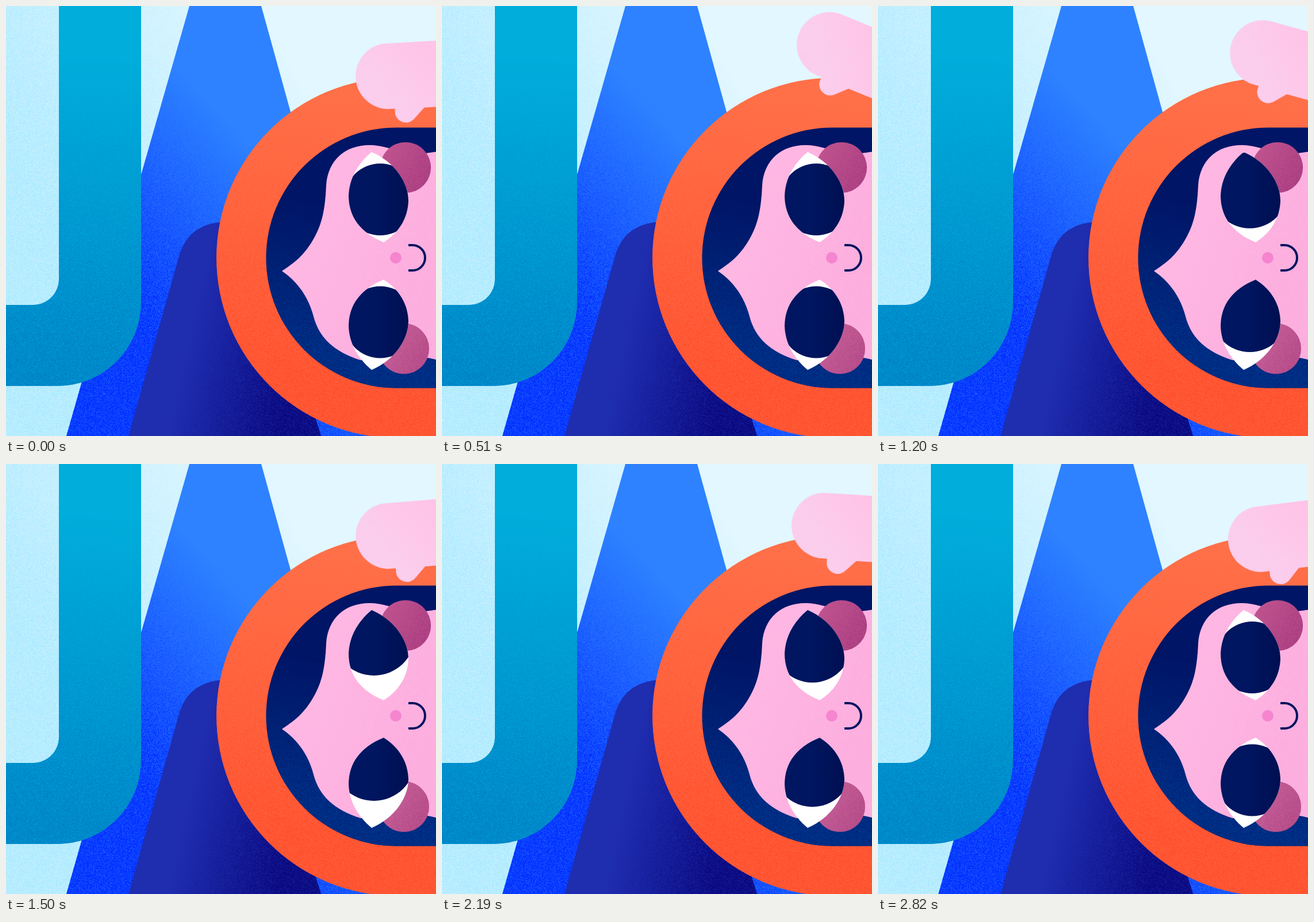
An HTML page with a canvas that plays this animation: 748x748 px, repeating every 2.85 s.

```html
<!DOCTYPE html>
<html>
<head>
<meta charset="utf-8">
<style>
html, body { margin: 0; width: 100%; height: 100%; overflow: hidden; background: #e2f7ff; }
canvas { display: block; }
</style>
</head>
<body>
<canvas id="stage" width="748" height="748"></canvas>
<script>
const W = 800, H = 748, LOOP = 2850, STEP = 30;
const ctx = document.getElementById('stage').getContext('2d');

let seed = 7;
const random = () => (seed = (seed * 1664525 + 1013904223) >>> 0) / 4294967296;

function makeLayer() {
  const c = document.createElement('canvas');
  c.width = W;
  c.height = H;
  return c.getContext('2d');
}

const grain = makeLayer();

// Fills a shape with one colour that dissolves in grain into another along a line.
function grainy(g, path, from, to, x0, y0, x1, y1) {
  const img = grain.createImageData(W, H), d = img.data;
  const dx = x1 - x0, dy = y1 - y0, len = dx * dx + dy * dy;
  for (let y = 0, i = 0; y < H; y++) {
    for (let x = 0; x < W; x++, i += 4) {
      const t = Math.max(0, Math.min(1, ((x - x0) * dx + (y - y0) * dy) / len));
      d.set(to, i);
      d[i + 3] = 255 * t * (0.4 + 0.85 * random());
    }
  }
  grain.putImageData(img, 0, 0);
  g.fillStyle = from;
  g.fill(path);
  g.save();
  g.clip(path);
  g.drawImage(grain.canvas, 0, 0);
  g.restore();
}

function circle(x, y, r) {
  const p = new Path2D();
  p.arc(x, y, r, 0, 2 * Math.PI);
  return p;
}

const hood = r => new Path2D(
  `M800 ${438 - r}H679A${r} ${r} 0 0 0 679 ${438 + r}H800Z`);

const scene = makeLayer();
const sky = new Path2D('M0 0H800V748H0Z');
const tower = new Path2D('M319 0H444L651 748H105Z');
const tube = new Path2D('M92 0H235V515A146 146 0 0 1 89 661H0V520H47A45 45 0 0 0 92 475Z');
const hill = new Path2D('M213 748L301 435Q316 382 372 376L440 400L548 748Z');
const face = new Path2D(`M800 245C760 250 725 262 690 255C665 247 650 242 633 242
  C590 242 560 268 557 312C555 360 548 385 531 412C517 434 503 446 480 461
  C504 477 526 504 535 540C545 578 572 602 617 616C660 610 710 605 748 615H800Z`);

grainy(scene, sky, '#e2f7ff', [170, 233, 255], 490, 90, 60, 330);
grainy(scene, tower, '#2e82ff', [0, 42, 255], 365, 180, 105, 420);
grainy(scene, tube, '#00addb', [0, 128, 197], 160, 90, 130, 640);
grainy(scene, hill, '#1f2daf', [8, 6, 122], 325, 560, 505, 600);
grainy(scene, hood(313), '#ff7049', [255, 78, 44], 600, 150, 560, 660);
grainy(scene, hood(226.5), '#001566', [0, 52, 140], 600, 350, 550, 610);
grainy(scene, face, '#ffbae5', [252, 172, 221], 460, 380, 720, 480);
grainy(scene, circle(695, 281, 44), '#c0548f', [168, 60, 128], 650, 260, 730, 300);
grainy(scene, circle(692, 596, 44), '#c7629a', [178, 72, 134], 650, 570, 730, 620);
scene.fillStyle = '#f585cf';
scene.fill(circle(678, 438, 10));
scene.strokeStyle = '#00145f';
scene.lineWidth = 4;
scene.stroke(new Path2D('M700 416H707A22 22 0 0 1 707 460H700'));

const PIVOT = { x: 790, y: 115 };
const arm = makeLayer();
const hand = new Path2D('M800 58H665A57 57 0 0 0 665 172H673V178A19 19 0 0 0 706 191L724 173H800Z');
grainy(arm, hand, '#ffc4e8', [250, 208, 238], 740, 70, 650, 140);

const upperEye = new Path2D(`M636 254C676 271 700 307 700 339C699 368 685 393 657 411
  C617 395 596 367 596 330C597 301 611 275 636 254Z`);
const lowerEye = new Path2D();
lowerEye.addPath(upperEye, new DOMMatrix([1, 0, 0, -1, 0, 887]));

const iris = ctx.createLinearGradient(640, 0, 700, 0);
iris.addColorStop(0, '#001660');
iris.addColorStop(1, '#000f52');

const mix = (a, b, k) => a + (b - a) * k;

function ease(t, start, end) {
  const k = Math.max(0, Math.min(1, (t - start) / (end - start)));
  return k * k * (3 - 2 * k);
}

// A steady wave that lingers a little around the middle of the loop.
function armAngle(t) {
  const linger = 0.2 * Math.sin(Math.PI * t / LOOP) ** 16;
  const phase = (t - 135) / 360 - linger;
  return (7.5 + 15.2 * Math.cos(2 * Math.PI * phase)) * Math.PI / 180;
}

function drawEye(shape, y, lookY, look) {
  ctx.fillStyle = '#fff';
  ctx.fill(shape);
  ctx.save();
  ctx.clip(shape);
  ctx.fillStyle = iris;
  ctx.fill(circle(mix(651, 640, look), mix(y, lookY, look), mix(62.5, 72, look)));
  ctx.restore();
}

function draw(now) {
  const t = Math.floor(now % LOOP / STEP) * STEP;
  const look = ease(t, 1110, 1320) - ease(t, 2100, 2310);
  ctx.drawImage(scene.canvas, 0, 0);
  drawEye(upperEye, 336.5, 296, look);
  drawEye(lowerEye, 550, 514, look);
  ctx.save();
  ctx.translate(PIVOT.x, PIVOT.y);
  ctx.rotate(armAngle(t));
  ctx.drawImage(arm.canvas, -PIVOT.x, -PIVOT.y);
  ctx.restore();
}

const start = performance.now();
function tick() {
  draw(performance.now() - start);
  requestAnimationFrame(tick);
}
tick();
</script>
</body>
</html>
```
